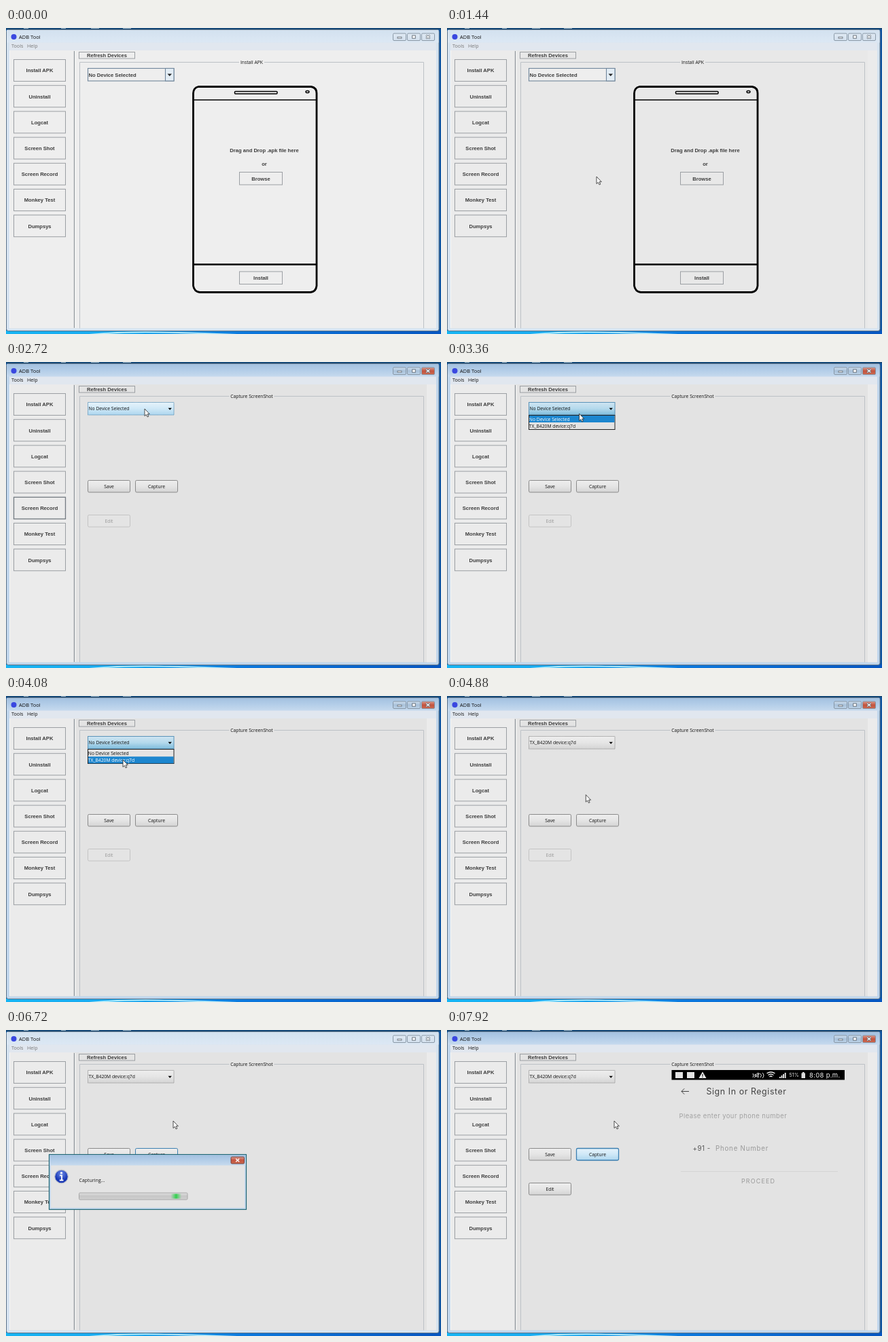
These frames come from a looping animation (640 px wide and 451 px high, 8000 ms). An HTML page:

```html
<!DOCTYPE html>
<html lang="en">
<head>
<meta charset="utf-8">
<title>ADB Tool</title>
<style>
html, body { margin: 0; width: 100%; height: 100%; overflow: hidden; background: #0f559f; }
svg { display: block; width: 100vw; height: 100vh; }
text { white-space: pre; }
.metal { font: bold 7.6px "Liberation Sans", Arial, sans-serif; fill: #3c3c3c; }
.native { font: 6.75px "Open Sans", sans-serif; fill: #111; }
.menu { font: 7.2px "Open Sans", sans-serif; }
.title { font: 7.5px "Open Sans", sans-serif; fill: #111; }
.phone { font-family: Inter, sans-serif; }
.mid { text-anchor: middle; }
</style>
</head>
<body>
<svg id="stage" viewBox="0 0 640 451" preserveAspectRatio="none">
  <defs>
    <linearGradient id="barOn" x2="0" y2="1"><stop stop-color="#a3c1e0"/><stop offset=".5" stop-color="#b3cde8"/><stop offset="1" stop-color="#c6daee"/></linearGradient>
    <linearGradient id="barOff" x2="0" y2="1"><stop stop-color="#d3e1ef"/><stop offset="1" stop-color="#dce8f4"/></linearGradient>
    <linearGradient id="grayBtn" x2="0" y2="1"><stop stop-color="#eeeeee"/><stop offset=".5" stop-color="#e5e5e5"/><stop offset="1" stop-color="#d4d4d4"/></linearGradient>
    <linearGradient id="blueBtn" x2="0" y2="1"><stop stop-color="#e6f3fb"/><stop offset=".5" stop-color="#cfe8f7"/><stop offset="1" stop-color="#add6ee"/></linearGradient>
    <linearGradient id="downBtn" x2="0" y2="1"><stop stop-color="#cfe5f2"/><stop offset=".5" stop-color="#b4d9ec"/><stop offset="1" stop-color="#7dbbdb"/></linearGradient>
    <linearGradient id="redBtn" x2="0" y2="1"><stop stop-color="#dc9a8c"/><stop offset=".5" stop-color="#c4533e"/><stop offset="1" stop-color="#cb6a50"/></linearGradient>
    <linearGradient id="winOn" x2="0" y2="1"><stop stop-color="#cfdeed"/><stop offset=".5" stop-color="#a9c1da"/><stop offset="1" stop-color="#bdd3e8"/></linearGradient>
    <linearGradient id="winOff" x2="0" y2="1"><stop stop-color="#dfe9f3"/><stop offset="1" stop-color="#d3e0ed"/></linearGradient>
    <linearGradient id="trough" x2="0" y2="1"><stop stop-color="#e0e0e0"/><stop offset=".5" stop-color="#c6c6c6"/><stop offset="1" stop-color="#d2d2d2"/></linearGradient>
    <linearGradient id="chunk"><stop stop-color="#3fd65a" stop-opacity="0"/><stop offset=".5" stop-color="#31cf4c"/><stop offset="1" stop-color="#3fd65a" stop-opacity="0"/></linearGradient>
    <linearGradient id="bottom"><stop stop-color="#16b4f2"/><stop offset=".3" stop-color="#1aa6ee"/><stop offset=".55" stop-color="#0c78dc"/><stop offset="1" stop-color="#0656c0"/></linearGradient>
    <radialGradient id="info" cy=".3"><stop stop-color="#6f8de8"/><stop offset="1" stop-color="#1735b4"/></radialGradient>
    <clipPath id="content"><rect x="5" y="33" width="628" height="409.5"/></clipPath>
    <clipPath id="progress"><rect x="108" y="239.5" width="158.5" height="10.5"/></clipPath>
  </defs>
</svg>
<script>
const LOOP = 8000;
const SHOT = 1920, OPEN = 3120, PICK = 4400, PRESS = 5520, WAIT = 5840, DONE = 7440;
const DEVICE = 'TX_B420M device:q7d';
const stage = document.getElementById('stage');

function add(parent, tag, attrs, text) {
  const el = document.createElementNS('http://www.w3.org/2000/svg', tag);
  for (const k in attrs) el.setAttribute(k, attrs[k]);
  if (text !== undefined) el.textContent = text;
  return parent.appendChild(el);
}
const set = (el, attrs) => { for (const k in attrs) el.setAttribute(k, attrs[k]); };
const show = (el, on) => el.setAttribute('display', on ? 'inline' : 'none');
const group = (parent, attrs = {}) => add(parent, 'g', attrs);
const rect = (p, x, y, width, height, fill, more = {}) => add(p, 'rect', { x, y, width, height, fill, ...more });
const path = (p, d, stroke, width = 1, fill = 'none') =>
  add(p, 'path', { d, stroke, 'stroke-width': width, fill });
const label = (p, x, y, text, cls, more = {}) => add(p, 'text', { x, y, class: cls, ...more }, text);

function metalButton(p, x, y, w, h, text) {
  const box = rect(p, x, y, w, h, 'none', { stroke: '#9b9fa3', 'stroke-width': 1 });
  label(p, x + w / 2, y + h / 2 + 2.8, text, 'metal mid');
  return box;
}
function nativeButton(p, x, y, w, h, text) {
  const box = rect(p, x, y, w, h, 'url(#grayBtn)', { stroke: '#8a8a8a', 'stroke-width': 1, rx: 1.8 });
  return { box, text: label(p, x + w / 2, y + h / 2 + 2.5, text, 'native mid') };
}

// Desktop and window frame
rect(stage, 0, 0, 640, 451, '#0f559f');
rect(stage, 0, 0, 640, 2, '#174a78');
for (const x of [26, 81, 125, 172]) rect(stage, x, 0, x > 100 ? 12 : 7, 1, '#a8bdca');
rect(stage, 0, 446, 640, 5, 'url(#bottom)');
path(stage, 'M120 452Q170 447.5 225 448.5T345 452', '#c8f4fb', 1.6);
const frameBox = rect(stage, .5, 2.5, 636.5, 444, '#d5e3f0', { stroke: '#5f7488', rx: 3 });
const bar = rect(stage, 1, 3, 635.5, 18.5, 'url(#barOff)');
add(stage, 'circle', { cx: 11.5, cy: 13, r: 4, fill: '#3a48e0' });
label(stage, 19, 15.8, 'ADB Tool', 'title');

const winButtons = [569.5, 590.5, 611.5].map(x =>
  rect(stage, x, 8, 19, 10.5, 'url(#winOff)', { stroke: '#8391a0', 'stroke-width': .9, rx: 1.5 }));
rect(stage, 576, 13.2, 6, 2, '#fff', { stroke: '#5c6772', 'stroke-width': .8 });
rect(stage, 597.7, 11, 4.6, 4.2, '#fff', { stroke: '#5c6772', 'stroke-width': .9 });
path(stage, 'M618.2 10.8l5.4 4.8m0-4.8l-5.4 4.8', '#5c6772', 2.6);
path(stage, 'M618.4 11l5 4.4m0-4.4l-5 4.4', '#fff', 1.2);

rect(stage, 5, 21.5, 628, 11.5, '#e1e7ef');
const menus = [label(stage, 8, 29.3, 'Tools', 'menu'), label(stage, 31, 29.3, 'Help', 'menu')];

const body = group(stage, { 'clip-path': 'url(#content)' });
const back = rect(body, 5, 33, 628, 410, '#eee');
const sides = [rect(body, 5, 33, 94, 410, '#eee'), rect(body, 619, 33, 14, 410, '#eee')];
path(body, 'M100.5 34V442', '#8d9499', 1.2);
path(body, 'M102 34V442M5.5 33V442', '#f6f6f6', 1);

const sideButtons = ['Install APK', 'Uninstall', 'Logcat', 'Screen Shot', 'Screen Record', 'Monkey Test', 'Dumpsys']
  .map((s, i) => metalButton(body, 11.5, 46.5 + i * 38.2, 76, 32, s));
metalButton(body, 107.5, 35.5, 82, 9.5, 'Refresh Devices');

function titledBorder(p, text, half) {
  path(p, `M${361.5 - half} 50.5H108.5V450M${361.5 + half} 50.5H614.5V450`, '#bcc1c6', 1);
  label(p, 361.5, 53, text, 'native mid');
}

// Install pane
const install = group(body);
titledBorder(install, 'Install APK', 18.5);
rect(install, 120.5, 59.5, 126.5, 18.5, '#eee', { stroke: '#71879c', 'stroke-width': 1.1 });
rect(install, 234.5, 59.5, 12.5, 18.5, '#e3edf5', { stroke: '#71879c', 'stroke-width': 1.1 });
path(install, 'M237.5 67.5h6.5l-3.25 3.6z', 'none', 0, '#222');
label(install, 121.5, 71.5, 'No Device Selected', 'metal');
path(install, 'M283 86.5H449Q457 88 457 96V380Q456 388.5 448 389.5H285Q277 388.5 275.5 380V96Q276 88 283 86.5Z', '#000', 2.8);
path(install, 'M275 106H457', '#000', 1.6);
path(install, 'M275 348.5H457', '#000', 2.4);
rect(install, 336.5, 93.5, 62.5, 3.6, 'none', { stroke: '#000', 'stroke-width': 1.5, rx: 1 });
add(install, 'ellipse', { cx: 443.5, cy: 94, rx: 2.5, ry: 1.6, fill: '#bbb', stroke: '#000', 'stroke-width': 1.4 });
label(install, 380, 183, 'Drag and Drop .apk file here', 'metal mid');
label(install, 380, 203, 'or', 'metal mid');
metalButton(install, 343.5, 212.5, 63, 18.5, 'Browse');
metalButton(install, 343.5, 359, 63, 18.5, 'Install');

// Screenshot pane
const shot = group(body);
titledBorder(shot, 'Capture ScreenShot', 33);
const combo = rect(shot, 120.5, 59.5, 126.5, 18.5, 'url(#grayBtn)', { stroke: '#999', 'stroke-width': 1 });
const comboText = label(shot, 121.5, 71.4, '', 'native');
path(shot, 'M238.5 67.8h5.4l-2.7 3z', 'none', 0, '#000');
nativeButton(shot, 120.5, 174.5, 62, 17.5, 'Save');
const capture = nativeButton(shot, 190.5, 174.5, 62, 17.5, 'Capture');
const edit = nativeButton(shot, 120.5, 225.5, 62, 17.5, 'Edit');

// Device picture
const pic = group(shot, { class: 'phone' });
rect(pic, 330.5, 59, 254.5, 14.5, '#000');
rect(pic, 336, 62, 11, 9, '#e4e4e4');
rect(pic, 353, 62, 11, 9, '#e4e4e4');
path(pic, 'M376 61.5l5.5 9.5h-11z', 'none', 0, '#eee');
path(pic, 'M376 65v3m0 .8v1.2', '#000', 1.1);
path(pic, 'M450 64q2 3 0 6M453 65.5h2l3-2.5v7l-3-2.5h-2zM460 64l-8 6M461 64q3 3 0 6M464 63q4 4 0 8', '#e4e4e4', 1);
path(pic, 'M470.5 64q6-4 12 0M472.5 66.5q4-3 8 0M474.5 69q2-2 4 0', '#eee', 1.3);
for (let i = 0; i < 4; i++) rect(pic, 489 + i * 2.6, 69 - i * 2, 1.8, 2 + i * 2, '#eee');
label(pic, 503.5, 69, '51%', '', { 'font-size': 7.2, fill: '#ddd' });
rect(pic, 521.5, 63.5, 5.5, 7.5, '#ddd');
rect(pic, 523, 62, 2.5, 2, '#ddd');
label(pic, 533, 69.8, '8:08 p.m.', '', { 'font-size': 9.5, 'letter-spacing': .3, fill: '#f2f2f2' });
path(pic, 'M356 90.5h-11m4.2-4.2l-4.2 4.2 4.2 4.2', '#444', 1);
label(pic, 381.5, 95, 'Sign In or Register', '', { 'font-size': 12.4, 'letter-spacing': .58, fill: '#444' });
label(pic, 341.5, 130, 'Please enter your phone number', '', { 'font-size': 9.5, 'letter-spacing': .4, fill: '#a2a2a2' });
label(pic, 361.5, 178, '+91 -', '', { 'font-size': 9.8, 'letter-spacing': .5, fill: '#555' });
label(pic, 395, 178, 'Phone Number', '', { 'font-size': 9.7, 'letter-spacing': .8, fill: '#999' });
path(pic, 'M344 208.5H575', '#d2d2d2', .8);
label(pic, 433, 226, 'PROCEED', '', { 'font-size': 9, 'letter-spacing': 1.1, fill: '#999' });

// Drop-down list
const list = group(shot);
rect(list, 120.5, 78.5, 126.5, 21, '#e3e3e3', { stroke: '#222', 'stroke-width': 1 });
const rows = [0, 1].map(i => rect(list, 121, 79 + i * 10.3, 125.5, 10, '#1c86cf'));
const rowText = ['No Device Selected', DEVICE].map((s, i) => label(list, 120.8, 86.6 + i * 10.4, s, 'native'));

// Progress dialog
const dialog = group(stage);
rect(dialog, 63.5, 183.5, 290, 81, '#c3d8ec', { stroke: '#1f6674', 'stroke-width': 1.2 });
rect(dialog, 64.2, 184.2, 288.6, 15.3, 'url(#barOn)');
rect(dialog, 66, 199.5, 285, 62.5, '#e4e4e4');
rect(dialog, 331, 187, 19.5, 10, 'url(#redBtn)', { stroke: '#6e3a37', 'stroke-width': .9, rx: 1.5 });
path(dialog, 'M338.2 189.7l5 4.6m0-4.6l-5 4.6', '#fff', 1.5);
add(dialog, 'circle', { cx: 81.5, cy: 216, r: 9.8, fill: 'url(#info)', stroke: '#b9bfcc', 'stroke-width': 1.2 });
add(dialog, 'circle', { cx: 81.5, cy: 210.7, r: 1.6, fill: '#fff' });
path(dialog, 'M79 214.3H82V221.3M78.8 221.5H84.5', '#fff', 1.8);
label(dialog, 107.5, 224, 'Capturing...', 'native', { 'letter-spacing': .15 });
rect(dialog, 107.5, 240, 159.5, 10, 'url(#trough)', { stroke: '#a8a8a8', 'stroke-width': 1, rx: 1.5 });
const marquee = group(dialog, { 'clip-path': 'url(#progress)' });
const chunk = rect(marquee, 0, 241.5, 16, 7, 'url(#chunk)');

const cursor = path(stage, 'M0 0V10.6L2.4 8.4 4.1 12 5.8 11.2 4.2 7.7H7.3Z', '#222', .8, '#fff');

// time, x, y
const route = [
  [960, 520, 330], [1120, 240, 214], [1440, 220, 219], [1800, 62, 180], [2160, 60, 183],
  [2360, 70, 204], [2720, 204, 69], [3200, 200, 70], [3640, 182, 90], [4080, 172, 94],
  [4560, 172, 95], [5120, 225, 178], [5600, 236, 182], [5840, 237, 182], [6320, 246, 134], [LOOP, 246, 134]
];
function pointer(t) {
  const i = route.findIndex(p => p[0] > t);
  if (i < 1) return [route[0][1], route[0][2]];
  const a = route[i - 1], b = route[i];
  const u = (t - a[0]) / (b[0] - a[0]), e = u * u * (3 - 2 * u);
  return [a[1] + (b[1] - a[1]) * e, a[2] + (b[2] - a[2]) * e];
}

function render(t) {
  const [x, y] = pointer(t);
  const over = (l, top, w, h) => x >= l && x <= l + w && y >= top && y <= top + h;
  const inShot = t >= SHOT, waiting = t >= WAIT && t < DONE;
  const active = t >= 1840 && !waiting, open = t >= OPEN && t < PICK;

  set(back, { fill: inShot ? '#e3e3e3' : t < 900 ? '#eee' : '#e8e8e8' });
  for (const s of sides) set(s, { fill: inShot ? '#ebebeb' : t < 900 ? '#eee' : '#ebebeb' });
  set(frameBox, { fill: active ? '#c0d6ec' : '#d5e3f0' });
  set(bar, { fill: active ? 'url(#barOn)' : 'url(#barOff)' });
  winButtons.forEach((b, i) => set(b, { fill: !active ? 'url(#winOff)' : i === 2 ? 'url(#redBtn)' : 'url(#winOn)' }));
  for (const m of menus) set(m, { fill: active ? '#111' : '#777' });
  sideButtons.forEach((b, i) => {
    const lit = i === 4 && t >= 2300 && t < 3000 || i === 3 && t >= 1800 && t < 2300;
    set(b, { stroke: lit ? '#747b82' : '#9b9fa3', 'stroke-width': lit ? 1.3 : 1 });
  });

  show(install, !inShot);
  show(shot, inShot);
  show(list, open);
  show(pic, t >= DONE);

  const hot = open || over(120, 59, 127, 19);
  set(combo, {
    fill: open ? 'url(#downBtn)' : hot ? 'url(#blueBtn)' : 'url(#grayBtn)',
    stroke: hot ? '#5b93b8' : '#999', 'stroke-dasharray': open ? 'none' : '1.4 .7'
  });
  comboText.textContent = t < PICK ? 'No Device Selected' : DEVICE;
  const pick = y >= 89 ? 1 : 0;
  rows.forEach((r, i) => show(r, i === pick));
  rowText.forEach((r, i) => r.style.fill = i === pick ? '#fff' : '#111');

  const focused = t >= PRESS;
  const lit = focused && !waiting || t > PICK && over(190, 174, 62, 18);
  set(capture.box, {
    fill: lit ? 'url(#blueBtn)' : 'url(#grayBtn)',
    stroke: lit || focused ? '#3c7fb1' : '#8a8a8a', 'stroke-width': lit && focused ? 1.3 : 1
  });
  const ready = t >= DONE;
  set(edit.box, { fill: ready ? 'url(#grayBtn)' : '#e4e4e4', stroke: ready ? '#8a8a8a' : '#c4c4c4' });
  edit.text.style.fill = ready ? '#111' : '#999';

  show(dialog, waiting);
  set(chunk, { x: 92 + (t - WAIT) % 1020 / 1020 * 174 });
  show(cursor, t >= 960);
  set(cursor, { transform: `translate(${x.toFixed(2)} ${y.toFixed(2)})` });
}

const start = performance.now();
function frame() {
  render((performance.now() - start) % LOOP);
  requestAnimationFrame(frame);
}
frame();
</script>
</body>
</html>
```
